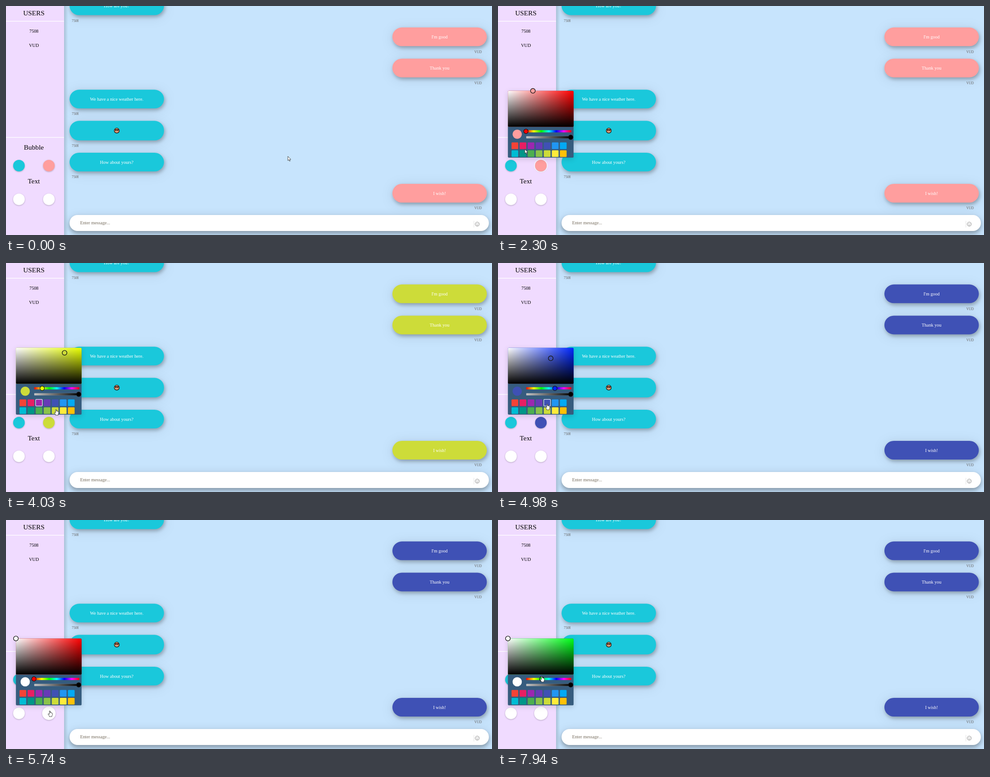
Animation, 1088 px wide and 515 px high, one loop 7.99 s. Source, as an HTML page:

```html
<!DOCTYPE html>
<html lang="en">
<head>
<meta charset="utf-8">
<title>Chat colours</title>
<style>
  html, body { margin: 0; width: 100%; height: 100%; overflow: hidden; background: #c7e4fd; }
  svg { display: block; width: 1088px; height: 515px; }
  text { font-family: "Liberation Serif", "Times New Roman", serif; font-size: 10.24px; }
  .title { font-size: 15.36px; }
  .name { font-size: 7.68px; fill: #625f5c; }
  .mid { text-anchor: middle; }
  .end { text-anchor: end; }
  .bubble { filter: drop-shadow(2px 4px 4px rgba(0,0,0,.27)) drop-shadow(0 3px 13px rgba(0,0,0,.1)); }
  .bar { filter: drop-shadow(0 5px 5px rgba(0,0,0,.25)) drop-shadow(0 4px 10px rgba(0,0,0,.15)); }
  .dot { filter: drop-shadow(0 1px 1.5px rgba(0,0,0,.25)); }
  .panel { filter: drop-shadow(0 3px 6px rgba(0,0,0,.15)); }
</style>
</head>
<body>
<svg id="stage" viewBox="0 0 1088 515">
  <defs>
    <linearGradient id="edge"><stop stop-color="#000" stop-opacity=".15"/><stop offset="1" stop-color="#000" stop-opacity="0"/></linearGradient>
    <linearGradient id="tint"><stop stop-color="#fff"/><stop offset="1" stop-color="#fff" stop-opacity="0"/></linearGradient>
    <linearGradient id="shade" x2="0" y2="1"><stop stop-color="#000" stop-opacity="0"/><stop offset="1"/></linearGradient>
    <linearGradient id="alpha"><stop stop-color="#000" stop-opacity="0"/><stop offset="1"/></linearGradient>
    <linearGradient id="rainbow"></linearGradient>
    <pattern id="check" width="3" height="3" patternUnits="userSpaceOnUse">
      <path d="M0 0h3v3h-3z" fill="#fff"/><path d="M0 0h1.5v3h1.5v-1.5h-3z" fill="#8a8a8a"/>
    </pattern>
  </defs>
</svg>
<script>
const LOOP = 7990;
const TEAL = '#1ac8db', PINK = '#ff9e9e', WHITE = '#ffffff';
const GUEST = '7508', HOST = 'VUD';
const SWATCHES = ['#f44336', '#e91e63', '#9c27b0', '#673ab7', '#3f51b5', '#2196f3', '#03a9f4',
  '#00bcd4', '#009688', '#4caf50', '#8bc34a', '#cddc39', '#ffeb3b', '#ffc107'];

// Each pick: time, colour, time its focus ring shows, swatch index.
const PICKS = [
  [0, PINK, 0, -1],
  [2510, SWATCHES[8], 2560, 8],
  [3350, SWATCHES[2], 3390, 2],
  [4010, SWATCHES[11], 4070, 11],
  [4690, SWATCHES[4], 4730, 4]
];

// Pointer path: time, x, y, shape on arrival (a = arrow, h = hand).
const PATH = [
  [0, 631, 338, 'a'], [350, 631, 338, 'a'], [620, 430, 400, 'a'], [860, 190, 440, 'a'],
  [1000, 62, 400, 'a'], [1130, 97, 361, 'h'], [1740, 97, 361, 'h'], [2000, 84, 345, 'a'],
  [2300, 60, 322, 'a'], [2400, 56, 328, 'h'], [2880, 56, 328, 'h'], [3250, 75, 314, 'h'],
  [3580, 75, 314, 'h'], [3950, 112, 329, 'h'], [4240, 112, 329, 'h'], [4600, 110, 317, 'h'],
  [4980, 110, 317, 'h'], [5150, 104, 401, 'a'], [5290, 104, 401, 'a'], [5430, 98, 429, 'h'],
  [5840, 98, 429, 'h'], [6040, 90, 404, 'a'], [6140, 90, 404, 'a'], [6160, 88, 402, 'a'],
  [6360, 88, 402, 'a'], [7120, 63, 353, 'h'], [7220, 63, 353, 'h'], [7940, 98, 351, 'h'],
  [LOOP, 98, 351, 'h']
];

const stage = document.getElementById('stage');

function add(tag, attrs, parent = stage, text = '') {
  const el = document.createElementNS('http://www.w3.org/2000/svg', tag);
  for (const key in attrs) el.setAttribute(key, attrs[key]);
  el.textContent = text;
  parent.append(el);
  return el;
}
const rect = (x, y, width, height, fill, more = {}, parent = stage) =>
  add('rect', { x, y, width, height, fill, ...more }, parent);
const circle = (cx, cy, r, fill, more = {}, parent = stage) =>
  add('circle', { cx, cy, r, fill, ...more }, parent);
const label = (x, y, text, cls = 'mid', fill = '#000') =>
  add('text', { x, y, class: cls, fill }, stage, text);

for (let i = 0; i <= 6; i++) {
  add('stop', { offset: i / 6, 'stop-color': `hsl(${i * 60},100%,50%)` }, document.getElementById('rainbow'));
}

// Chat
const hostParts = [];
rect(0, 0, 1088, 515, '#c7e4fd');

function message(y, text, mine, h = 42) {
  const x = mine ? 865 : 142.3;
  const box = rect(x, y, 211.4, h, mine ? PINK : TEAL, { rx: 21, class: 'bubble' });
  if (mine) hostParts.push(box);
  label(x + 105.5, y + h / 2 + 3.7, text, 'mid', WHITE);
  if (mine) label(1065, y + 57.3, HOST, 'name end');
  else label(147.3, y + h + 15, GUEST, 'name');
}
message(-21.5, 'How are you?', false);
message(48.3, 'I\'m good', true);
message(118.4, 'Thank you', true);
message(188.3, 'We have a nice weather here.', false);
message(258.3, '', false, 44);
message(330, 'How about yours?', false);
message(400, 'I wish!', true);

circle(248, 280.3, 5.6, '#f2a56f', { stroke: '#15100e', 'stroke-width': 1.3 });
add('path', { d: 'M243.5 277.2h4l.5 .7 .5-.7h4l-.8 3-1.4.8-1.8-1.5h-1l-1.8 1.5-1.4-.8z', fill: '#35171a' });
add('path', { d: 'M245.5 282.2q2.5 3.4 5 0z', fill: WHITE, stroke: '#5a2a20', 'stroke-width': .5 });

rect(142.3, 470, 938.7, 36, WHITE, { rx: 18, class: 'bar' });
label(166, 491.3, 'Enter message...', '', '#756b5c');
rect(1047, 483, .8, 15, '#ddd');
circle(1055, 490.6, 4.7, 'none', { stroke: '#858585', 'stroke-width': .9 });
circle(1053.3, 489.3, .75, '#777');
circle(1056.7, 489.3, .75, '#777');
add('path', { d: 'M1052.4 491.8q2.6 3 5.2 0', fill: 'none', stroke: '#777', 'stroke-width': .8 });

// Sidebar
rect(130, 0, 9, 515, 'url(#edge)');
rect(0, 0, 130, 515, '#f0dbff');
rect(0, 33.6, 130, 1.4, WHITE);
rect(0, 294.8, 130, 1.4, WHITE);
label(62.3, 20.8, 'USERS', 'title mid');
label(62.5, 59.6, GUEST);
label(62.5, 92.4, HOST);
label(62.3, 322.8, 'Bubble', 'title mid');
label(62.3, 398.9, 'Text', 'title mid');
const dot = (x, y, fill) => circle(x, y, 13, fill, { class: 'dot' });
const focusRing = y => circle(96, y, 14.3, 'none', { stroke: WHITE, 'stroke-width': 1.2 });
dot(29, 359, TEAL);
hostParts.push(dot(96, 359, PINK));
dot(29, 434.7, WHITE);
const textDot = dot(96, 434.7, WHITE);
const bubbleRing = focusRing(359);

// Colour picker, laid out from its top left corner
const picker = add('g', {});
rect(0, 0, 147, 150.3, '#365c7e', { rx: 2, class: 'panel' }, picker);
const field = rect(0, 0, 147, 81, 'red', { rx: 2 }, picker);
rect(0, 0, 147, 81, 'url(#tint)', { rx: 2 }, picker);
rect(0, 0, 147, 81, 'url(#shade)', { rx: 2 }, picker);
const preview = circle(20.8, 97.5, 10.4, PINK, {}, picker);
rect(41, 88.5, 101, 5, 'url(#rainbow)', { rx: 1 }, picker);
rect(41, 102, 101, 5, 'url(#check)', { rx: 1 }, picker);
rect(41, 102, 101, 5, 'url(#alpha)', { rx: 1 }, picker);
const edge = { stroke: '#111', 'stroke-width': 1.2 };
const hueThumb = circle(0, 91, 5, 'red', edge, picker);
circle(140.6, 104.4, 5, '#000', edge, picker);
const swatchAt = i => [8.1 + i % 7 * 18.05, 115.9 + Math.floor(i / 7) * 17.8];
SWATCHES.forEach((c, i) => rect(...swatchAt(i), 15, 15, c, { rx: 1.5 }, picker));
const ring = rect(0, 0, 15, 15, 'none', { rx: 1.5, stroke: '#e8eef5', 'stroke-width': 1.2 }, picker);
const marker = circle(0, 0, 5.3, PINK, { stroke: '#161616', 'stroke-width': 1.4 }, picker);

// Pointers, with the hot spot at 0,0
const ink = { fill: WHITE, stroke: '#222', 'stroke-width': .8, 'stroke-linejoin': 'round' };
const pointers = {
  a: add('path', { d: 'M0 0V9.6L2.2 7.6 3.8 11 5.3 10.3 3.8 7.1H6.7Z', ...ink }),
  h: add('path', { d: 'M-.9 .7Q0-.6 .9 .7V4.2Q2-.1 2.7 4.8 4 3.6 4.3 5.3 5.8 4.5 5.9 6.4V9.2L4.8 11.4V13.2H-1.1V11.7L-3.8 7.8Q-3.9 6.2-2.3 6.9L-.9 8.2Z', ...ink })
};

const set = (el, attrs) => { for (const key in attrs) el.setAttribute(key, attrs[key]); };
const ramp = (t, from, to) => Math.min(1, Math.max(0, (t - from) / (to - from)));
const ease = p => p * p * (3 - 2 * p);

function hsv(hex) {
  const [r, g, b] = [1, 3, 5].map(i => parseInt(hex.slice(i, i + 2), 16) / 255);
  const max = Math.max(r, g, b), d = max - Math.min(r, g, b);
  let h = 0;
  if (d) h = max === r ? (g - b) / d : max === g ? (b - r) / d + 2 : (r - g) / d + 4;
  return { h: (h * 60 + 360) % 360, s: max ? d / max : 0, v: max };
}

function opacityAt(t) {
  if (t < 1180) return 0;
  if (t < 5060) return .65 + .35 * ramp(t, 1180, 1260);
  if (t < 5400) return 1 - ramp(t, 5060, 5150);
  return ramp(t, 5440, 5590);
}

function drawPicker(t, color) {
  const editingText = t >= 5300;
  const shown = editingText ? WHITE : color;
  const { h, s, v } = hsv(shown);
  const hue = editingText ? 126 * ease(ramp(t, 7220, 7940)) : h;
  const pure = `hsl(${hue},100%,50%)`;
  set(picker, { transform: `translate(22.2 ${editingText ? 266.4 : 190.8})`, opacity: opacityAt(t) });
  set(field, { fill: pure });
  set(preview, { fill: shown });
  set(hueThumb, { cx: 40.4 + hue / 360 * 101, fill: pure });
  set(marker, { cx: s * 147, cy: (1 - v) * 81, fill: shown });
  const focused = editingText ? -1 : PICKS.filter(p => t >= p[2]).pop()[3];
  const [x, y] = swatchAt(Math.max(0, focused));
  set(ring, { x, y, opacity: focused < 0 ? 0 : 1 });
}

function drawPointer(t) {
  const i = Math.max(1, PATH.findIndex(p => p[0] > t));
  const [t0, x0, y0, before] = PATH[i - 1], [t1, x1, y1, after] = PATH[i];
  const p = ramp(t, t0, t1), e = ease(p);
  const kind = p > .7 ? after : before;
  for (const key in pointers) {
    set(pointers[key], {
      transform: `translate(${x0 + (x1 - x0) * e} ${y0 + (y1 - y0) * e})`,
      visibility: key === kind ? 'visible' : 'hidden'
    });
  }
}

function draw(t) {
  const color = PICKS.filter(p => t >= p[0]).pop()[1];
  hostParts.forEach(el => { if (el.getAttribute('fill') !== color) set(el, { fill: color }); });
  set(bubbleRing, { opacity: t > 1260 && t < 2510 ? 1 : 0 });
  set(textDot, { r: 13 + 2 * ramp(t, 5400, 5500) });
  drawPicker(t, color);
  drawPointer(t);
}

const start = performance.now();
function tick() {
  draw((performance.now() - start) % LOOP);
  requestAnimationFrame(tick);
}
tick();
</script>
</body>
</html>
```
